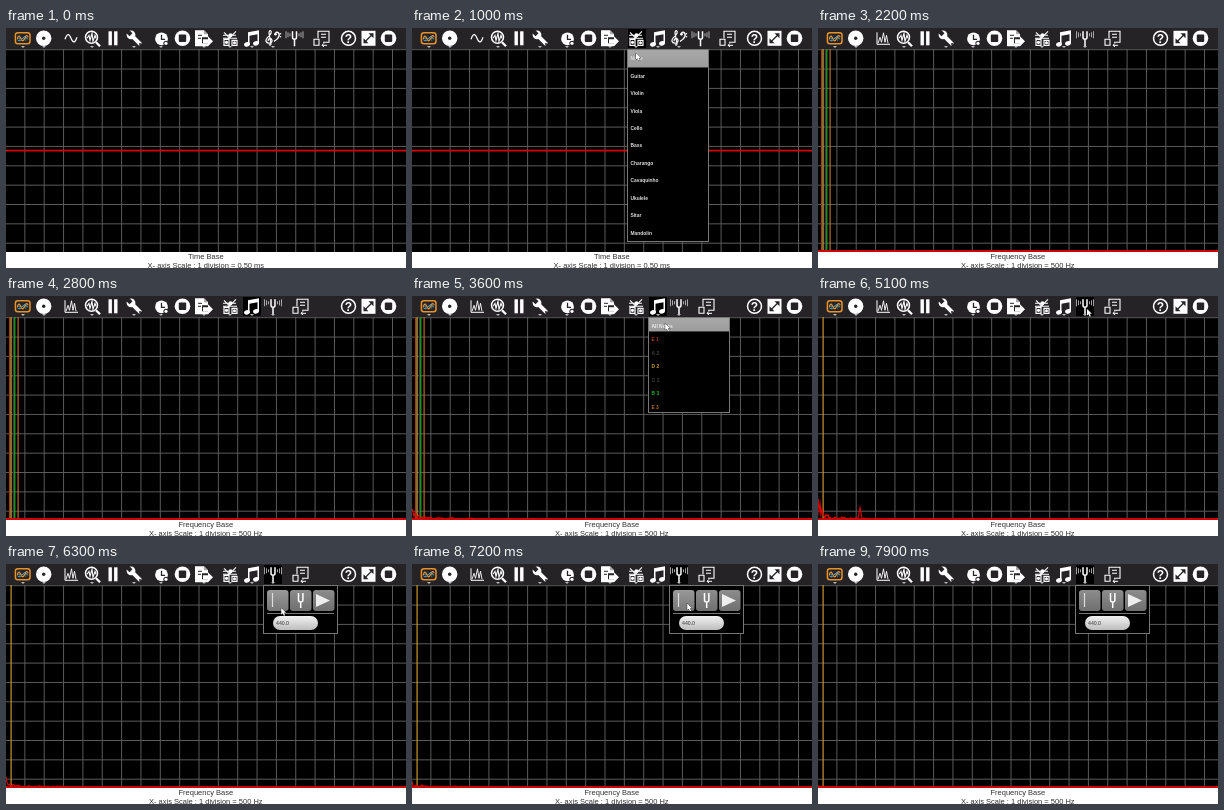
An HTML page with a canvas that plays this animation: 400x240 px, repeating every 8000 ms.

```html
<!DOCTYPE html>
<html lang="en">
<head>
<meta charset="utf-8">
<title>Sound analyser</title>
<style>
html, body { margin: 0; width: 100%; height: 100%; overflow: hidden; background: #000; }
canvas { display: block; width: 100vw; height: 100vh; }
</style>
</head>
<body>
<canvas width="400" height="240"></canvas>
<script>
const LOOP = 8000, STEP = 100, DIVISION = 19.35, BAR = '#252326', RED = '#d80000';
const ctx = document.querySelector('canvas').getContext('2d');

const instruments = ['None', 'Guitar', 'Violin', 'Viola', 'Cello', 'Bass', 'Charango',
  'Cavaquinho', 'Ukulele', 'Sitar', 'Mandolin'];
const strings = [
  { name: 'E 1', x: 3.5, color: '#a03c14' },
  { name: 'A 2', x: 4.5, color: '#444' },
  { name: 'D 2', x: 5, color: '#c8962a' },
  { name: 'G 2', x: 7.3, color: '#3c3c3c' },
  { name: 'B 3', x: 8.7, color: '#22b022' },
  { name: 'E 3', x: 12, color: '#b86a24' }
];

// Keyframes: [time, value...]
const cursorPaths = [
  [[300, 225, 11], [800, 225, 13], [1000, 224, 25], [1200, 226, 30], [1500, 230, 47], [1600, 230, 47]],
  [[3000, 247, 11], [3300, 248, 14], [3700, 255, 32], [4100, 259, 66], [4500, 259, 66],
   [4800, 266, 20], [5100, 269, 13], [5700, 269, 13], [6200, 275, 44], [6600, 276, 44],
   [7400, 275, 38], [7700, 312, 40]]
];
const noiseLevel = [[0, 0], [2900, 0], [3400, 9], [4200, 7], [4700, 12], [5100, 20], [5700, 13],
  [6300, 9], [7000, 7], [7900, 0.8], [8000, 0.8]];
const harmonicLevel = [[0, 0], [4700, 0], [5000, 11], [5100, 11], [5700, 0], [8000, 0]];

const during = (t, start, end) => t >= start && t < end;

function sample(keys, t) {
  const i = Math.max(1, keys.findIndex(key => key[0] > t));
  const [a, b] = [keys[i - 1], keys[i]];
  const k = (t - a[0]) / (b[0] - a[0]);
  return a.slice(1).map((v, j) => v + (b[j + 1] - v) * k);
}

function random(x, frame) {
  const v = Math.sin(x * 12.9898 + frame * 78.233) * 43758.5453;
  return v - Math.floor(v);
}

function rect(x, y, w, h, color) {
  ctx.fillStyle = color;
  ctx.fillRect(x, y, w, h);
}

function fill(d, color = '#fff') {
  ctx.fillStyle = color;
  ctx.fill(new Path2D(d), 'evenodd');
}

function line(d, width = 1, color = '#fff') {
  ctx.strokeStyle = color;
  ctx.lineWidth = width;
  ctx.stroke(new Path2D(d));
}

function disc(x, y, r, color = '#fff') {
  ctx.fillStyle = color;
  ctx.beginPath();
  ctx.arc(x, y, r, 0, 7);
  ctx.fill();
}

function ring(x, y, r, width, color = '#fff') {
  ctx.strokeStyle = color;
  ctx.lineWidth = width;
  ctx.beginPath();
  ctx.arc(x, y, r, 0, 7);
  ctx.stroke();
}

function rounded(x, y, w, h, r, color) {
  ctx.fillStyle = color;
  ctx.beginPath();
  ctx.roundRect(x, y, w, h, r);
  ctx.fill();
}

function text(s, x, y, size, color, align = 'left', weight = '') {
  ctx.font = `${weight} ${size}px "Liberation Sans", Arial, sans-serif`;
  ctx.textAlign = align;
  ctx.fillStyle = color;
  ctx.fillText(s, x, y);
}

function shade(y, h, top, bottom) {
  const g = ctx.createLinearGradient(0, y, 0, y + h);
  g.addColorStop(0, top);
  g.addColorStop(1, bottom);
  return g;
}

// Icons are drawn around their own centre.
const icons = {
  scope() {
    ctx.strokeStyle = '#e8922a';
    ctx.lineWidth = 1.5;
    ctx.beginPath();
    ctx.roundRect(-7.3, -5.5, 14.6, 11, 2.5);
    ctx.stroke();
    line('M-5.5 0H5.5M-3-3V3M3-3V3', 0.7, '#3f7f98');
    line('M-5.5 1Q-4-5-2 0T2 0 5.5-1', 1.2, '#e8922a');
    line('M-5 2Q-2 4 0 0T5 1', 1, '#5aa0b8');
  },
  record() { disc(0, 0, 7.7); disc(0, 0, 1.7, BAR); },
  sine() { line('M-6 1C-4-5-2-5 0 0S4 5 6-1', 1.2); },
  peaks() { line('M-6-6V6H7', 1); line('M-5 5L-3-1-1.5 4 0.5-5.5 2 4 3.5-3 5 5', 0.9); },
  zoom() {
    ring(-0.5, -1, 6, 1.5);
    line('M4 4L8 8', 2.3);
    line('M-5 0L-3-3-2 2 0-5 1 3 3-3 4 0', 1.1);
  },
  pause() { rect(-4.5, -7, 3.4, 14, '#fff'); rect(1.1, -7, 3.4, 14, '#fff'); },
  wrench() {
    line('M-1-1L6 6', 4);
    disc(-3.5, -3.5, 4.4);
    fill('M-9-6L-6-9-2-5-5-2Z', BAR);
    disc(5.5, 5.7, 1, BAR);
  },
  timer() {
    disc(0, 0.5, 6.4);
    line('M0-3.5V1H3.5', 1.3, BAR);
    disc(4.5, 5, 2.6, BAR);
    disc(4.5, 5, 1.6);
  },
  stop() { disc(0, 0, 7.8); rounded(-3.7, -3.7, 7.4, 7.4, 1, BAR); },
  save() {
    fill('M-8-8H1L5-4V-1H-1V5H5V8H-8Z');
    fill('M1-4V-8L5-4Z', '#aaa');
    fill('M0 1H5V-2L10 3 5 8V5H0Z');
    line('M-5-3H-1M-5 0H-2', 1, BAR);
  },
  instruments() {
    line('M-7-3H6M-6-6L0 0M6-7L-2 1M-7 0H7', 1.1);
    line('M-6 7V1H-1V7ZM2 7V2H7V7Z', 1.2);
    disc(-3.5, 4, 1.6);
    disc(0.5, -3, 2);
    disc(4.5, 4.5, 1.5);
  },
  notes() {
    fill('M-4-6L7-8V5H5.5V-4L-2.5-2.5V6H-4Z');
    ctx.fillStyle = '#fff';
    for (const [x, y] of [[-5, 6], [4, 5]]) {
      ctx.beginPath();
      ctx.ellipse(x, y, 3, 2.2, -0.3, 0, 7);
      ctx.fill();
    }
  },
  clefs() {
    line('M-4 6Q-2 8-2 5L-4-5C-4-9-1-8-2-5S-8 0-7 3 0 5-1 2-5 0-5 3', 1.2);
    line('M2-4C3-8 7-6 6-2Q5 1 1 3', 1.4);
    disc(2.5, -4, 1.3);
    disc(7.6, -4.5, 0.7);
    disc(7.6, -1.5, 0.7);
  },
  fork() {
    line('M-2-7V-1Q-2 1 0 1T2-1V-7M0 1V8', 1.5);
    line('M-4.5-5V-2M-6.5-6V-1M-8.5-7V0M4.5-5V-2M6.5-6V-1M8.5-7V0', 0.8, '#ccc');
  },
  copy() {
    line('M-3 0V-7H8V4H2M0-4H5M0-1H5M-7 1H-2V7H-7Z', 1.1);
    line('M1 7H6M3 5L1 7 3 8.5', 1);
  },
  help() { ring(0, 0, 7, 1.5); text('?', 0, 4.2, 12, '#fff', 'center', 'bold'); },
  expand() {
    rect(-7, -7.5, 14, 15, '#fff');
    line('M-4 4L4-4', 1.3, BAR);
    fill('M0-5H5V0ZM-5 0V5H0Z', BAR);
  }
};

function icon(name, x, y = 10.3) {
  ctx.save();
  ctx.translate(x, y);
  icons[name]();
  ctx.restore();
}

function toolbar(t, frequency) {
  rect(0, 0, 400, 21, BAR);
  const forkX = frequency ? 267 : 288.5;
  const hover = during(t, 300, 1600) ? 225 : during(t, 2600, 4700) ? 246 : t >= 4800 ? forkX : 0;
  if (hover) rect(Math.round(hover) - 9, 1, 18, 19, '#000');

  const layout = [['scope', 16.7], ['record', 37.7], [frequency ? 'peaks' : 'sine', 65],
    ['zoom', 86], ['pause', 107], ['wrench', 128.5], ['timer', 155.5], ['stop', 176.5],
    ['save', 197], ['instruments', 224], ['notes', 246], ['fork', forkX],
    ['copy', frequency ? 294 : 315], ['help', 342.5], ['expand', 362.5], ['stop', 382.5]];
  if (!frequency) layout.push(['clefs', 267]);
  for (const [name, x] of layout) icon(name, x);
  for (const x of [17, 38, 86, 128, 155, 198, 224, 246, 267])
    fill(`M${x - 2} 18H${x + 2}L${x} 20Z`, '#bbb');
}

function grid() {
  rect(0, 21, 400, 203, '#000');
  for (let i = 1; i <= 20; i++) rect(i * DIVISION - 1, 21, 1, 203, '#5a5a5a');
  for (let i = 0; i <= 10; i++) rect(0, 21.2 + i * DIVISION, 400, 1, '#5a5a5a');
}

function spectrum(t) {
  const shown = t < 4500 ? strings : [strings[2]];
  for (const s of shown) rect(s.x - 0.5, 21, 1.2, 202, s.color);

  const level = sample(noiseLevel, t)[0], harmonic = sample(harmonicLevel, t)[0];
  const frame = t / STEP;
  ctx.beginPath();
  for (let x = 0; x <= 400; x++) {
    const low = level * Math.exp(-x / 5) * (x < 1 ? 1 : 1.4 * random(x, frame) ** 2);
    const hiss = x < 85 ? Math.min(level, 8) * 0.25 * random(x, frame + 3) ** 2 * (1 - x / 85) : 0;
    const peak = harmonic * Math.max(0, 1 - Math.abs(x - 42) / 2);
    ctx.lineTo(x, 222.8 - low - hiss - peak);
  }
  ctx.strokeStyle = RED;
  ctx.lineWidth = 1.2;
  ctx.stroke();
  rect(0, 222.2, 400, 1.8, RED);
}

function footer(title, scale) {
  rect(0, 224, 400, 16, '#fff');
  text(title, 199.8, 231.3, 7.5, '#333', 'center');
  text('X- axis Scale : 1 division = ' + scale, 199.8, 239.5, 7.5, '#333', 'center');
}

function panel(x, y, w, h) {
  rect(x, y, w, h, '#000');
  ctx.strokeStyle = '#777';
  ctx.lineWidth = 1;
  ctx.strokeRect(x + 0.5, y + 0.5, w - 1, h - 1);
}

function listMenu(x, w, h, rows, first, pitch, pointerY) {
  panel(x, 21, w, h);
  const hovered = Math.floor((pointerY - 22) / pitch);
  rows.forEach(({ name, color }, i) => {
    const top = 22 + i * pitch;
    if (i === 0) rect(x + 1, top, w - 2, pitch, shade(top, pitch, '#a8a8a8', '#9c9c9c'));
    else if (i === hovered) rect(x + 1, top, w - 2, pitch, '#6c6c6c');
    text(name, x + 3.5, first + i * pitch, 4.9, color, 'left', 'bold');
  });
}

function forkMenu(pointer) {
  panel(257, 21, 75, 49);
  [261, 284, 307].forEach((x, i) => {
    const hot = pointer && pointer[0] >= x && pointer[0] < x + 22 && pointer[1] > 26 && pointer[1] < 47;
    rounded(x, 26, 21.5, 21, 3, hot ? shade(26, 21, '#999', '#777') : shade(26, 21, '#8c8c8c', '#707070'));
    if (i === 0) line('M266.5 29V43', 1.2, '#ddd');
    if (i === 1) line('M292.5 29V36Q292.5 38 294.7 38T296.9 36V29M294.7 38V44', 1.5);
    if (i === 2) fill('M310 30L324 36.5 310 43Z', '#eee');
  });
  rect(261, 49, 67, 1, '#777');
  rounded(267, 52, 45, 14, 7, shade(52, 14, '#f2f2f2', '#bdbdbd'));
  text('440.0', 270, 60.7, 5.2, '#333');
}

function pointerAt(t) {
  const path = cursorPaths.find(p => during(t, p[0][0], p[p.length - 1][0]));
  return path && sample(path, t);
}

function drawPointer([x, y]) {
  const d = 'M0 0V6.5L1.6 5.2 2.7 7.7 3.8 7.2 2.7 4.8H4.8Z';
  ctx.save();
  ctx.translate(x, y);
  line(d, 0.8, '#222');
  fill(d);
  ctx.restore();
}

function draw(t) {
  const frequency = t >= 2200;
  const pointer = pointerAt(t);
  const pointerY = pointer ? pointer[1] : 0;

  grid();
  if (frequency) spectrum(t);
  else rect(0, 121.7, 400, 1.8, RED);
  footer(frequency ? 'Frequency Base' : 'Time Base', frequency ? '500 Hz' : '0.50 ms');
  toolbar(t, frequency);

  if (during(t, 800, 1600))
    listMenu(215, 82, 193, instruments.map(name => ({ name, color: '#ddd' })), 32.2, 17.45, pointerY);
  if (during(t, 3300, 4500))
    listMenu(236, 82, 96, [{ name: 'All Notes', color: '#eee' }, ...strings], 32, 13.45, pointerY);
  if (t >= 5800) forkMenu(pointer);
  if (pointer) drawPointer(pointer);
}

function tick() {
  draw(Math.floor(performance.now() % LOOP / STEP) * STEP);
  requestAnimationFrame(tick);
}
tick();
</script>
</body>
</html>
```
